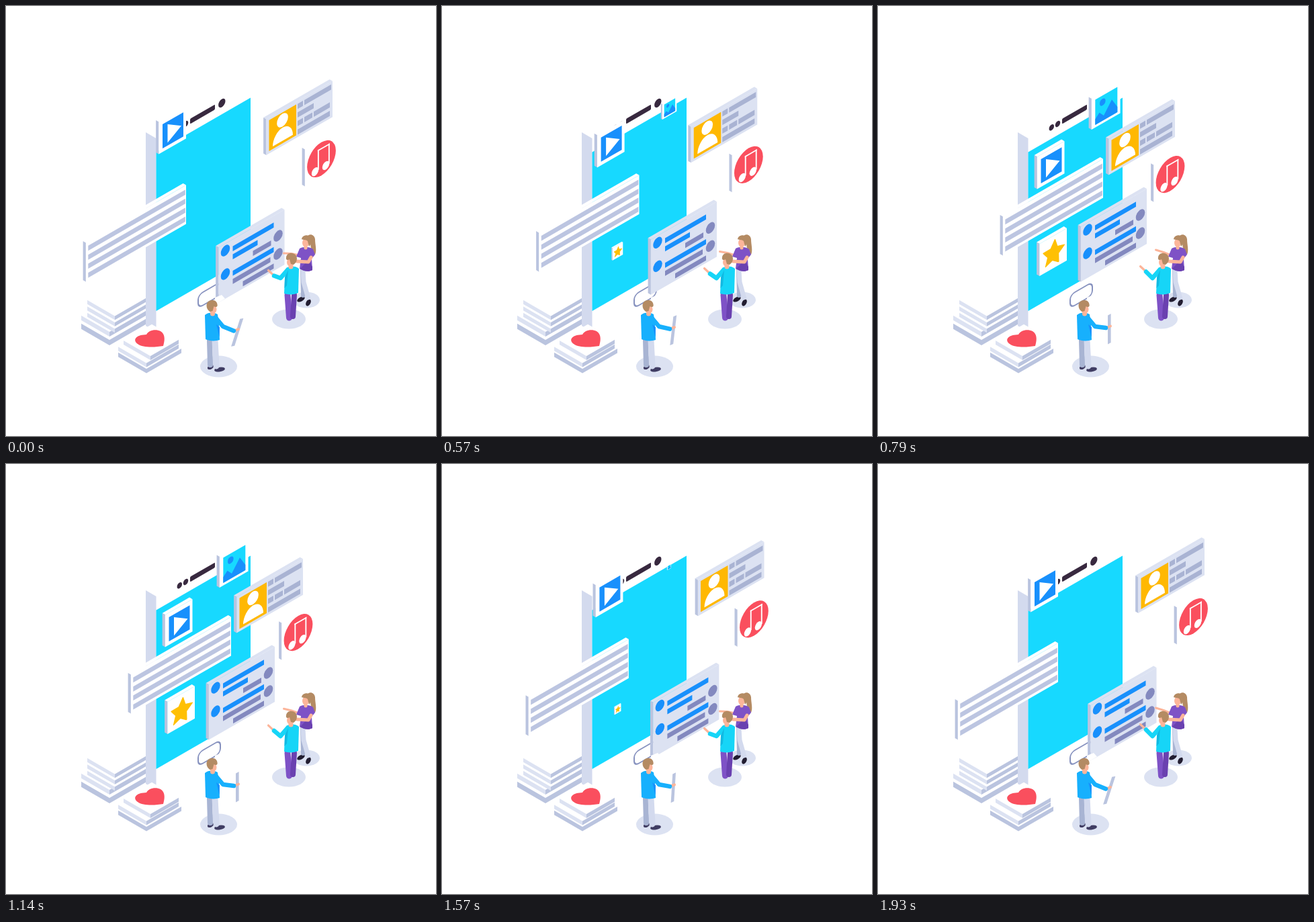
Write an HTML page with a canvas that moves like this. It is 640 px wide and 640 px high and loops after 2.43 s.

```html
<!DOCTYPE html>
<html lang="en">
<head>
<meta charset="utf-8">
<title>Isometric app panels</title>
<style>
html, body { margin: 0; width: 100%; height: 100%; overflow: hidden; background: #fff; }
canvas { display: block; width: 100vw; height: 100vh; }
</style>
</head>
<body>
<canvas id="stage" width="640" height="640"></canvas>
<script>
const ctx = document.getElementById('stage').getContext('2d');
const LOOP = 2430, TICKS = 34, SLOPE = 0.577;
const C = {
  white: '#ffffff', cyan: '#17d9ff', blue: '#1890fc', side: '#bac4df', pale: '#dce2f2',
  phone: '#d3daee', line: '#bcc5e1', info: '#a9b3d3', violet: '#8389bf', dark: '#38293f',
  yellow: '#ffb802', star: '#ffc003', red: '#fa4f5e', skin: '#fcb59a', hair: '#b48b63',
  purple: '#7e52c6', deep: '#6a41b0', shoe: '#403d63', boot: '#221d31', shirt: '#17b0fd',
  tee: '#16d5f7', trousers: '#d3daee', fold: '#a8b4d3', outline: '#8792bf'
};

// Smooth 0..1 ramp, in ticks
function ease(n, start, length) {
  const u = Math.min(1, Math.max(0, (n - start) / length));
  return u * u * (3 - 2 * u);
}

function trace(p) {
  ctx.beginPath();
  for (let i = 0; i < p.length; i += 2) ctx.lineTo(p[i], p[i + 1]);
}
function poly(color, ...p) {
  trace(p);
  ctx.fillStyle = color;
  ctx.fill();
}
function limb(color, width, ...p) {
  trace(p);
  ctx.strokeStyle = color;
  ctx.lineWidth = width;
  ctx.lineCap = ctx.lineJoin = 'round';
  ctx.stroke();
}
function oval(color, x, y, rx, ry, turn = 0, from = 0, to = 7) {
  ctx.beginPath();
  ctx.ellipse(x, y, rx, ry, turn, from, to);
  ctx.fillStyle = color;
  ctx.fill();
}
const disc = (color, x, y, r) => oval(color, x, y, r * 0.866, r);
function rect(color, x, y, w, h) {
  ctx.fillStyle = color;
  ctx.fillRect(x, y, w, h);
}
function round(x, y, w, h, r) {
  ctx.beginPath();
  ctx.roundRect(x, y, w, h, r);
}
function shape(color, d) {
  ctx.fillStyle = color;
  ctx.fill(new Path2D(d));
}
function at(x, y, draw, sx = 1, sy = sx, turn = 0) {
  ctx.save();
  ctx.translate(x, y);
  ctx.rotate(turn);
  ctx.scale(sx, sy);
  draw();
  ctx.restore();
}

// Draws on the wall plane: x runs up to the right, y runs straight down
function wall(x, y, draw) {
  ctx.save();
  ctx.transform(1, -SLOPE, 0, 1, x, y);
  draw();
  ctx.restore();
}
// Upright face with its left edge dropping along the floor direction
const leftFace = (color, x, y, w, h) =>
  poly(color, x, y, x - w, y - w * SLOPE, x - w, y - w * SLOPE + h, x, y + h);

function panel(x, y, w, h, face, draw) {
  const d = 4.4, dy = d * SLOPE, rise = w * SLOPE;
  poly(face, x, y, x - d, y - dy, x + w - d, y - dy - rise, x + w, y - rise);
  leftFace(C.side, x, y, d, h);
  wall(x, y, () => {
    rect(face, -0.2, 0, w + 0.2, h);
    draw();
  });
}

// Flat slab seen from its front corner
function sheet(x, y, left, right, h, shade = C.pale) {
  const ly = y - left * SLOPE, ry = y - right * SLOPE;
  poly(C.white, x, y, x - left, ly, x + right - left, ly + ry - y, x + right, ry);
  leftFace(shade, x, y, left, h);
  wall(x, y, () => rect(C.side, 0, 0, right, h));
}

function paperStack() {
  sheet(154, 497, 42, 68, 8, C.side);
  sheet(154, 485, 42, 60, 7);
  for (let i = 0; i < 3; i++) sheet(162, 480.5 - 9.5 * i, 41, 52, 5.8);
}

function heartStack() {
  sheet(209, 540, 42, 52, 6.5, C.side);
  sheet(209, 531.5, 42, 48, 6);
  sheet(215, 521, 40, 42, 6);
  shape(C.red, 'M209 489C212 483 222 480 230 484C238 489 236 499 234 506C222 508 204 509 196 503C188 497 194 491 202 489.7Z');
}

function phone() {
  leftFace(C.phone, 223.5, 197, 15.5, 288);
  wall(223.5, 217.5, () => rect(C.cyan, 0, 0, 140.5, 236.5));
  wall(0, 329.8, () => {
    disc(C.dark, 258.3, 0, 4.3);
    disc(C.dark, 267.5, 0, 4.3);
    disc(C.dark, 321.3, 0, 6);
    round(274, -3.8, 37, 7.6, 1.5);
    ctx.fill();
  });
}

function videoCard(p) {
  panel(227.5 + 9.5 * p, 172.5 + 52 * p, 40.5, 48, C.white, () => {
    rect(C.blue, 5.5, 6.7, 31, 36);
    poly(C.white, 13, 11, 33.5, 25, 13, 38.5);
  });
}

function textCard(p) {
  panel(119 + 67 * p, 352.5 - 39 * p, 149, 58, C.white, () => {
    for (let i = 0; i < 4; i++) rect(C.line, 3.3, 6.2 + 13.4 * i, 144.5, 7.5);
  });
}

function imageCard(scale) {
  at(338, 154, () => panel(-20, -16, 42.5, 46, C.white, () => {
    rect(C.cyan, 5.3, 4.5, 33, 37.5);
    disc(C.blue, 16.3, 14.5, 5);
    poly(C.blue, 5.3, 42, 5.3, 33.5, 11.5, 27.5, 18, 35.5, 30, 18.5, 38.3, 34, 38.3, 42);
  }), scale);
}

function starCard(scale) {
  at(262, 364.5, () => panel(-21.5, -10.5, 40.5, 48, C.white, () => {
    const p = [];
    for (let i = 0; i <= 10; i++) {
      const a = (i * 36 - 82) * Math.PI / 180, r = i % 2 ? 9.5 : 19;
      p.push(20.5 + Math.cos(a) * r * 0.866, 25.8 + Math.sin(a) * r);
    }
    poly(C.star, ...p);
    limb(C.star, 1.6, ...p);
  }), scale);
}

function profileCard(p) {
  panel(387.5 - 44 * p, 168.5 + 29.5 * p, 98.5, 53.5, C.pale, () => {
    rect(C.yellow, 4, 3.8, 40.5, 46);
    disc(C.white, 24, 15.3, 9.6);
    oval(C.white, 24.5, 46, 15, 19.5, 0, Math.PI, 0);
    const rows = [[1, 5], [3], [1, 1.5, 3], [6]];
    rows.forEach((words, i) => {
      let x = 46.5;
      for (const size of words) {
        rect(C.info, x, 4 + 12.7 * i, size * 8, 7.7);
        x += size * 8 + 2;
      }
    });
  });
}

function musicCard(p) {
  panel(445 - 34.5 * p, 213.5 + 23.2 * p, 49, 55, C.white, () => {
    disc(C.red, 24.5, 28.1, 24.7);
    for (const x of [15, 31]) {
      disc(C.white, x, 41.8, 6);
      rect(C.white, x + 3.9, 12, 1.9, 30);
    }
    rect(C.white, 18.9, 12, 17.9, 2);
  });
}

function chatCard(p) {
  panel(316.5 - 14.5 * p, 359.5 - 31 * p, 98, 82, C.pale, () => {
    for (let i = 0; i < 2; i++) {
      disc(C.blue, 10, 10.3 + 35 * i, 7.8);
      disc(C.violet, 88.5, 33.6 + 27 * i, 7.8);
    }
    const bars = [[0, 61], [0, 37], [30, 27], [0, 61], [0, 56], [15, 46]];
    bars.forEach(([x, w], i) => {
      const sent = i < 2 || i === 3;
      rect(sent ? C.blue : C.violet, 21 + x, 10 + 12.2 * i, w, 7.5);
    });
  });
  poly(C.white, 311, 434, 321, 430, 326, 435.5, 311, 445);
}

function bubble() {
  wall(286, 430, () => {
    round(0, 0, 33, 19.5, 7);
    ctx.strokeStyle = C.outline;
    ctx.lineWidth = 2;
    ctx.stroke();
  });
}

function head(x, y) {
  at(x, y, () => {
    limb(C.skin, 7, 1, 9, 1, 12);
    oval(C.skin, 2, 5.5, 5, 6);
    shape(C.hair, 'M-8 0C-8 -10 7 -11 8 -2C9 2 6 3 3 1L1 8L-3 9C-6 7 -8 4 -8 0Z');
  });
}
function torso(color, x, y, flip) {
  at(x, y, () => shape(color, 'M3 2C7 -1 17 -2 22 3L21 39C15 42 6 42 0 40L1 17Z'), flip, 1);
}

function presenter(tilt) {
  const hand = 475.5 + 4.5 * tilt;
  oval(C.pale, 316.5, 536.5, 27.5, 16);
  oval(C.shoe, 304.5, 537.5, 5, 3, -0.5);
  oval(C.shoe, 318, 541, 8, 3.4, -0.15);
  limb(C.fold, 8, 303, 498, 304, 534);
  limb(C.trousers, 9, 311, 498, 313, 536);
  at(344.3, 480.5 + 5 * tilt, () => poly(C.side, -2.3, -20, 2.3, -22.5, 2.3, 20.5, -2.3, 23), 1, 1, tilt * 0.31);
  limb(C.skin, 4, 338, hand + 4, 346, hand + 1);
  limb(C.shirt, 6.5, 313, 465, 323, 477, 339, hand + 3.5);
  torso(C.shirt, 318, 457, -1);
  poly(C.blue, 313, 474, 318, 478, 317.7, 493);
  head(306.5, 446);
}

function woman(arm) {
  oval(C.pale, 447, 437.5, 20, 12);
  oval(C.boot, 439, 436.5, 6.3, 3.2, -0.5);
  oval(C.boot, 450, 441.5, 3.3, 5.3, 0.5);
  limb(C.fold, 6, 441, 392, 442, 431);
  limb(C.trousers, 7, 442, 394, 443, 411, 449.5, 434);
  limb(C.skin, 3, 436, 371, 425, 366.5 + 2 * arm, 413.5, 363 + 5 * arm);
  shape(C.hair, 'M448 344C450 338 459 339 460 347C460 355 463 364 460 370C456 368 453 361 453 352Z');
  shape(C.purple, 'M437 361C442 358 452 358 457 362L460 370L455 376L456 393C451 396 443 395 437 391L439 375L432 373Z');
  shape(C.deep, 'M450 378L456 388L456 393C451 396 443 395 438 391Z');
  limb(C.skin, 5, 454, 374, 450, 381, 433, 380);
  limb(C.skin, 5, 446, 355, 446, 360);
  oval(C.skin, 446, 352.5, 5, 6.3);
  shape(C.hair, 'M440 347C441 340 452 339 454 346C455 352 453 356 451 358L449 350C446 347 442 349 440 347Z');
}

function guide(arm) {
  const hand = 387.5 + 6 * arm;
  oval(C.pale, 421, 466, 25, 14.5);
  limb(C.purple, 9, 419, 430, 421.5, 464);
  limb(C.deep, 8, 429, 430, 427, 462);
  limb(C.skin, 3.2, 398, hand + 7, 390.5, hand);
  limb(C.tee, 6.5, 419, 393, 408.5, 405, 399, hand + 8);
  torso(C.tee, 414, 388, 1);
  poly('#12b9e2', 415, 404, 420, 393, 418, 416, 414.5, 420);
  at(425, 376, () => head(0, 0), -1, 1);
}

function draw(now) {
  const n = Math.floor((now % LOOP) / LOOP * TICKS + 0.07) % TICKS;
  const slide = ease(n, 5.9, 5) - ease(n, 18.25, 4.95);
  const picture = ease(n, 5.5, 5) - ease(n, 17.6, 5.7);
  const star = ease(n, 5.9, 5) - ease(n, 18.3, 5.4);
  const tilt = 1 - ease(n, 5.2, 4.8) + ease(n, 20, 7);
  const arm = 1 - ease(n, 5, 6) + ease(n, 13, 9) - ease(n, 22, 5);

  rect(C.white, 0, 0, 640, 640);
  paperStack();
  phone();
  heartStack();
  videoCard(slide);
  if (picture > 0.01) imageCard(picture);
  if (star > 0.01) starCard(star);
  textCard(slide);
  profileCard(slide);
  musicCard(slide);
  bubble();
  chatCard(slide);
  woman(arm);
  guide(arm);
  presenter(tilt);
}

function loop() {
  draw(performance.now());
  requestAnimationFrame(loop);
}
loop();
</script>
</body>
</html>
```
